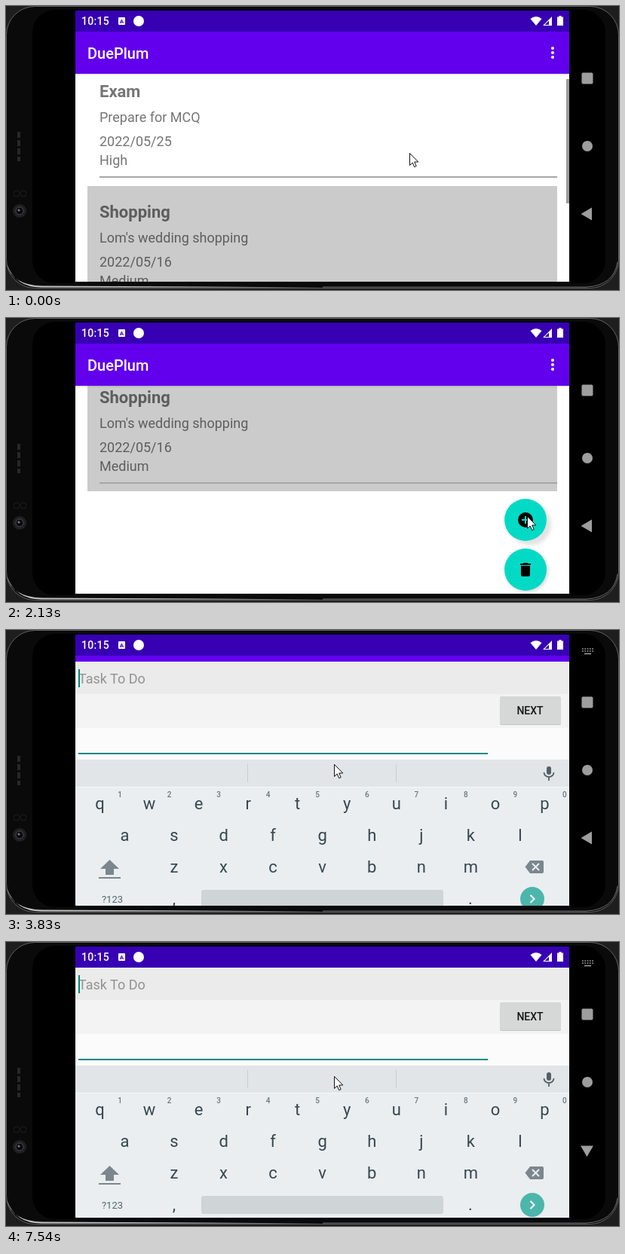
An HTML page that plays this animation: 813 px wide and 377 px high, repeating every 8000 ms.

```html
<!DOCTYPE html>
<html lang="en">
<head>
<meta charset="utf-8">
<title>Task list on a phone</title>
<style>
html, body { margin: 0; width: 100%; height: 100%; overflow: hidden; background: #000; }
svg { display: block; width: 813px; height: 377px; font-family: Roboto, sans-serif; }
.title { font-size: 20px; font-weight: 500; fill: #fff; }
.head { font-size: 22px; font-weight: 700; }
.body { font-size: 18px; }
.item { fill: #000; fill-opacity: .54; }
.label { font-size: 16px; letter-spacing: .15px; fill: #000; fill-opacity: .42; }
.key { font-size: 22px; fill: #37474f; text-anchor: middle; }
.digit { font-size: 10px; font-weight: 500; fill: #6b777d; text-anchor: middle; }
.nav { fill: #9e9e9e; }
.thumb { fill: #9c9c9c; }
</style>
</head>
<body>
<svg viewBox="0 0 813 377">
  <defs>
    <clipPath id="screen"><rect x="36" y="6" width="758" height="360"/></clipPath>
    <clipPath id="panel"><rect x="92" y="34" width="655" height="332"/></clipPath>
    <clipPath id="list"><rect x="92" y="90" width="655" height="276"/></clipPath>
    <filter id="blur" x="-40%" y="-40%" width="180%" height="180%"><feGaussianBlur stdDeviation="2.5"/></filter>
    <rect id="page" x="92" y="6" width="655" height="360" fill="#fff"/>
    <g id="top">
      <rect x="92" y="90" width="655" height="2" fill="#000" opacity=".07"/>
      <rect x="92" y="6" width="655" height="28" fill="#3700b3"/>
      <rect x="92" y="34" width="655" height="56" fill="#6200ee"/>
      <text class="title" x="108" y="70">DuePlum</text>
    </g>
  </defs>

  <!-- Phone body -->
  <rect width="813" height="377" fill="#1e1e1f"/>
  <rect x=".5" y=".5" width="812" height="374" rx="38" fill="#0a0a0b" stroke="#626264"/>
  <path d="M1 342Q8 371 48 371.500L420 373.500H48Q12 374 1 342Z" fill="#c8c8c8"/>
  <path d="M420 373H770Q806 371 811 340" fill="none" stroke="#6c6c6e"/>
  <rect x="35" y="5" width="760" height="363" rx="30"/>
  <path d="M17 167V206" stroke="#28282a" stroke-width="4" stroke-dasharray="8 3"/>
  <g fill="none" stroke="#1d1d1f">
    <circle cx="14" cy="249" r="4"/><circle cx="23" cy="249" r="4"/>
  </g>
  <circle cx="18" cy="272" r="9" fill="#202022"/>
  <circle cx="18" cy="272" r="5" fill="#09090b" stroke="#4b4b4f"/>
  <circle cx="17" cy="271" r="1.6" fill="#77777b"/>

  <!-- Navigation -->
  <g class="nav">
    <rect x="763.5" y="88.500" width="15" height="15" rx="2"/>
    <circle cx="771" cy="186" r="7"/>
    <path id="back" d="M762.500 276L777 267.500V284.500Z"/>
    <g id="kbd" stroke="#9e9e9e" stroke-width="1.6">
      <path d="M764 25H779M764 28H779" stroke-dasharray="1.8 1.5"/>
      <path d="M767 31.5H776"/>
    </g>
  </g>

  <g clip-path="url(#screen)">
    <!-- Task list -->
    <g id="home">
      <use href="#page"/>
      <g clip-path="url(#list)">
        <g id="rows"></g>
        <path id="glow" d="M92 230V216Q419 158 747 216V230Z" fill="#6200ee" opacity=".08"/>
        <rect id="thumb" class="thumb" x="743" width="4" height="165"/>
      </g>
      <use href="#top"/>
      <g fill="#fff">
        <circle cx="725" cy="56" r="2"/><circle cx="725" cy="62" r="2"/><circle cx="725" cy="68" r="2"/>
      </g>
    </g>

    <!-- New task form -->
    <g id="form">
      <use href="#page"/>
      <use href="#top"/>
      <path d="M142 309V144Q142 140 146 140H693Q697 140 697 144V309Z" fill="#e0e0e0"/>
      <path d="M142 195.5H697M142 250.5H697M142 308.5H697" stroke="#7e7e7e"/>
      <path id="active" d="M142 195H697" stroke="#6200ee" stroke-width="2"/>
      <text id="hint" class="label">Task To Do</text>
      <text class="label" x="158" y="237">Task Description</text>
      <text class="label" x="192" y="293">Choose Date</text>
      <g fill="#979797">
        <path fill-rule="evenodd" d="M163 279H177Q179 279 179 281V295Q179 297 177 297H163Q161 297 161 295V281Q161 279 163 279ZM163 284V295H177V284Z"/>
        <path d="M164 277h2v3h-2zM174 277h2v3h-2zM165 287h2v2h-2zM169 287h2v2h-2zM173 287h2v2h-2z"/>
      </g>
      <rect class="thumb" x="693" y="140" width="4" height="104"/>
    </g>

    <!-- Full-screen keyboard -->
    <g clip-path="url(#panel)">
      <g id="ime">
        <rect x="92" y="34" width="655" height="43" fill="#ebebeb"/>
        <rect x="92" y="77" width="655" height="45" fill="#f3f3f3"/>
        <rect x="92" y="122" width="655" height="43" fill="#fbfbfb"/>
        <text class="body" x="96" y="63" fill="#929292">Task To Do</text>
        <rect id="caret" x="96" y="44" width="2" height="24" fill="#00857a"/>
        <rect x="96" y="155" width="543" height="2" fill="#018786"/>
        <rect x="655" y="81" width="81" height="37" rx="2" fill="#c2c3c3"/>
        <rect x="655" y="80" width="81" height="37" rx="2" fill="#d6d7d7"/>
        <text x="695" y="104" font-size="14" font-weight="500" text-anchor="middle" fill="#151515">NEXT</text>
        <rect x="92" y="164" width="655" height="36" fill="#e1e5e8"/>
        <rect x="92" y="200" width="655" height="174" fill="#eaeef1"/>
        <path d="M92 200.5H747" stroke="#f5f7f8"/>
        <path d="M320.5 170V194M517.5 170V194" stroke="#c9ced1"/>
        <rect x="717" y="173" width="6" height="11" rx="3" fill="#546066"/>
        <path d="M713.5 181A6.5 6 0 0 0 726.5 181M720 187V192" fill="none" stroke="#546066" stroke-width="1.8"/>
        <g id="keys"></g>
        <g fill="#7b878d">
          <path d="M137.5 297L150 309H143V317H132V309H125ZM123 320h29v2h-29z"/>
          <path d="M695 298H711Q713 298 713 300V313Q713 315 711 315H695L688.5 306.5Z"/>
        </g>
        <path d="M698 302L707 311M707 302L698 311" stroke="#eaeef1" stroke-width="2"/>
        <text x="141" y="354" font-size="13" text-anchor="middle" fill="#55636a">?123</text>
        <rect x="259" y="337" width="321" height="24" rx="3" fill="#cfd4d7"/>
        <circle cx="698" cy="349" r="16" fill="#4db6ac"/>
        <path d="M695.5 344L700.5 349L695.5 354" fill="none" stroke="#fff" stroke-width="2"/>
      </g>
    </g>

    <!-- Status icons -->
    <g fill="#fff">
      <text x="100" y="25" font-size="14" font-weight="500" letter-spacing=".3">10:15</text>
      <rect x="149" y="15" width="9" height="10" rx="1"/>
      <text x="153.5" y="23" font-size="8" font-weight="700" text-anchor="middle" fill="#3700b3">A</text>
      <circle cx="176" cy="20" r="7"/>
      <path d="M695.5 17Q703 11 710.5 17L703 26Z"/>
      <path d="M724 14V26H712ZM723 16.5L714.5 25H720V19.5Z" fill-rule="evenodd"/>
      <path d="M733.5 13h3v1.5h2.5v11.5h-8v-11.5h2.5z"/>
    </g>
  </g>

  <path id="cursor" d="M.5 .5V16.5L4.2 13L6.7 18.7L9.2 17.6L6.7 12H11.8Z" fill="#fff" stroke="#111"/>
</svg>

<script>
const LOOP = 8000;
const SCROLL = 168;
const KEY_GAP = 65.55;

const $ = id => document.getElementById(id);
const set = (id, name, value) => $(id).setAttribute(name, value);
const show = (id, on) => set(id, 'visibility', on ? 'visible' : 'hidden');
const zoom = s => `translate(419.5 186) scale(${s}) translate(-419.5 -186)`;
const easeOut = p => 1 - (1 - p) ** 3;

// Progress from 0 to 1, held in equal steps.
const phase = (t, from, to, steps) =>
  Math.floor(Math.min(1, Math.max(0, (t - from) / (to - from))) * steps + 1e-6) / steps;

function task(y, lines) {
  const base = [0, 33, 65, 89.5];
  return lines.map((s, i) =>
    `<text class="item ${i ? 'body' : 'head'}" x="124" y="${y + base[i]}">${s}</text>`).join('') +
    `<rect x="124" y="${y + 105}" width="607" height="2" fill="#a6a6a6"/>`;
}

const fab = (y, name, icon) =>
  `<circle id="${name}" cx="691" cy="${y + 2}" r="28" opacity=".16" filter="url(#blur)"/>
  <circle cx="689" cy="${y}" r="28" fill="#03dac5"/>
  <g transform="translate(689 ${y})">${icon}</g>`;

const keyRow = (chars, x, y, cls = 'key') => [...chars].map((c, i) =>
  `<text class="${cls}" x="${x + i * KEY_GAP}" y="${y}">${c}</text>`).join('');

function build() {
  $('rows').innerHTML =
    task(121, ['Exam', 'Prepare for MCQ', '2022/05/25', 'High']) +
    '<rect x="108" y="239" width="623" height="159" fill="#cbcbcb"/>' +
    task(281, ['Shopping', "Lom's wedding shopping", '2022/05/16', 'Medium']) +
    fab(436, 'addShadow', `<circle r="10"/><path d="M-5 0H5M0 -5V5" stroke="#03dac5" stroke-width="2"/>
      <circle id="ripple" r="28" opacity=".12"/>`) +
    fab(502, 'binShadow',
      '<path d="M-7 -8H-3.5L-2.5 -9H2.5L3.5 -8H7V-6H-7ZM-6 -5H6V7Q6 9 4 9H-4Q-6 9 -6 7Z"/>');

  $('keys').innerHTML = keyRow('qwertyuiop', 124.5, 230) + keyRow('1234567890', 151, 214, 'digit') +
    keyRow('asdfghjkl', 157.5, 272) + keyRow('zxcvbnm', 223, 314) +
    keyRow(',', 223, 356) + keyRow('.', 616, 356);
}

// Each leg moves the pointer on from where the last one ended.
function pointer(drag, aim, leave, settle) {
  const legs = [[drag, 543, -15], [easeOut(aim), 691, 263], [leave, 435, 149], [settle, 435, 178]];
  return legs.reduce(([x, y], [p, tx, ty]) => [x + (tx - x) * p, y + (ty - y) * p], [535, 195]);
}

function draw(t) {
  const drag = phase(t, 0, 560, 4);
  const aim = phase(t, 740, 1500, 6);
  const open = phase(t, 2160, 2640, 4);
  const focus = phase(t, 3290, 3570, 2);
  const slide = phase(t, 3830, 4080, 2);
  const typing = t >= 3830;

  const [x, y] = pointer(drag, aim, phase(t, 2280, 2760, 4), phase(t, 2780, 3020, 2));
  set('cursor', 'transform', `translate(${x} ${y})`);

  set('rows', 'transform', `translate(0 ${-SCROLL * drag})`);
  set('thumb', 'y', 97 + 100 * drag);
  set('thumb', 'opacity', 1 - aim);
  show('glow', t >= 560 && t < 720);

  const raised = t >= 1880;
  set('addShadow', 'transform', raised ? 'translate(4 4)' : '');
  set('addShadow', 'opacity', raised ? .11 : .16);
  set('ripple', 'visibility', raised && t < 2130 ? 'inherit' : 'hidden');

  show('home', open < 1);
  set('home', 'transform', zoom(1 + .05 * open));
  set('form', 'opacity', Math.min(1, 2 * open));
  set('form', 'transform', zoom(.85 + .15 * easeOut(open)));

  // The label floats up and shrinks as the field gains focus.
  const float = focus ** 2;
  set('hint', 'transform', `translate(158 ${181 - 21 * float}) scale(${1 - .25 * float})`);
  $('hint').style.fill = focus === 1 ? '#6200ee' : '';
  $('hint').style.fillOpacity = focus === 1 ? .87 : '';
  show('active', focus === 1);
  show('kbd', focus === 1);

  show('ime', typing);
  set('ime', 'transform', `translate(0 ${8 * (1 - slide) ** 2})`);
  set('back', 'transform', `rotate(${-90 * phase(t, 3830, 4230, 3)} 771 276.5)`);
  show('caret', typing && Math.floor((t - 4100) / 490) % 2);
}

build();
const start = performance.now();
function tick(now) {
  draw(Math.max(0, now - start) % LOOP);
  requestAnimationFrame(tick);
}
tick(start);
</script>
</body>
</html>
```
